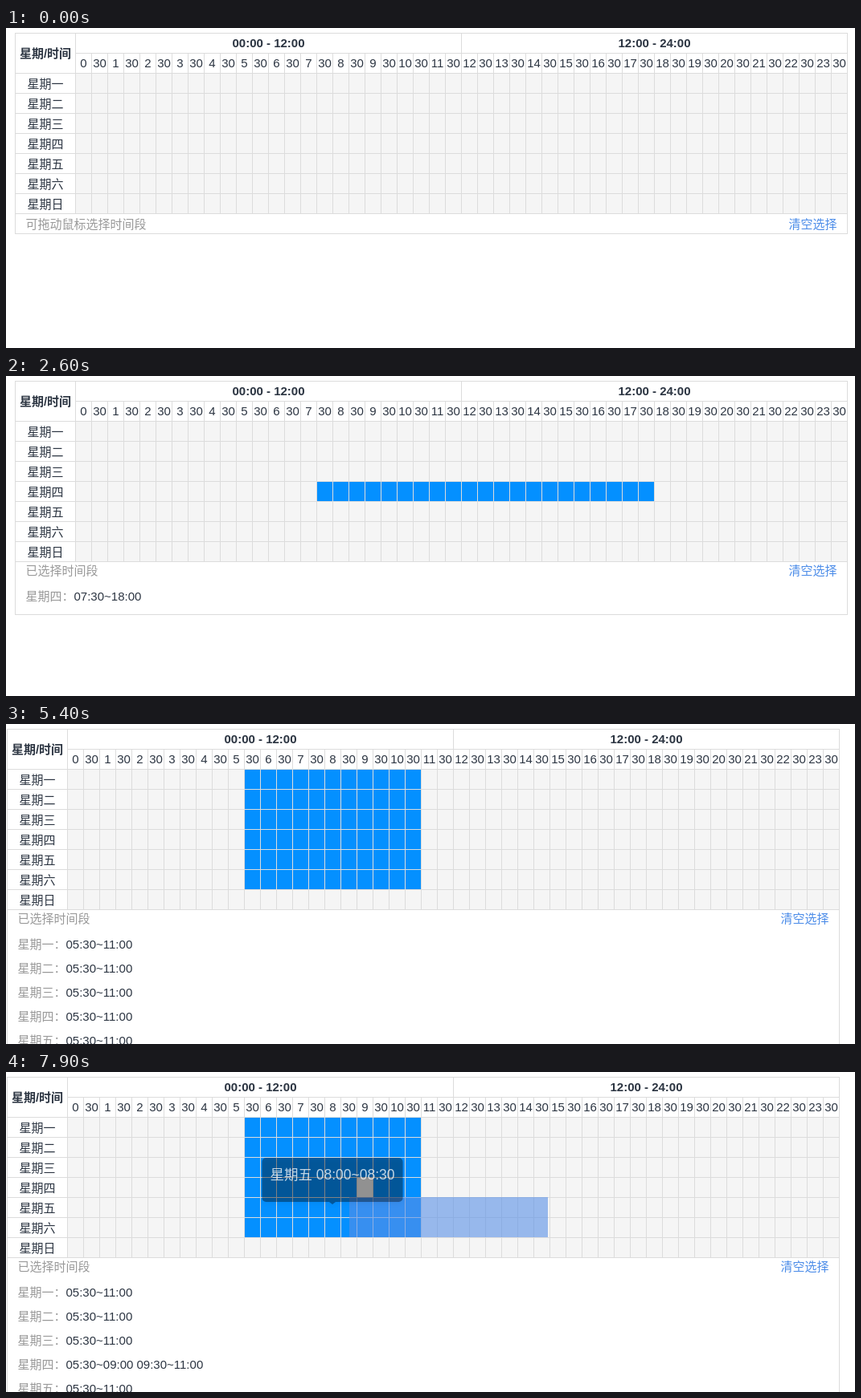
Write an HTML page with a canvas that moves like this. It is 1056 by 399 pixels and loops after 8000 ms.

```html
<!DOCTYPE html>
<html lang="zh-CN">
<head>
<meta charset="utf-8">
<style>
html, body { margin: 0; width: 100%; height: 100%; overflow: hidden; background: #fff; }
canvas { display: block; }
</style>
</head>
<body>
<canvas id="stage" width="1056" height="399"></canvas>
<script>
const ctx = document.getElementById('stage').getContext('2d');
const FONT = '"Liberation Sans", "Noto Sans CJK SC", sans-serif';
const DAYS = [...'一二三四五六日'].map(d => '星期' + d);
const INK = '#2c3542', GREY = '#999', LINE = '#dcdcdc', LINK = '#4a8be8';
const LOOP = 8000, STEP = 100;
const CELL_W = 20, ROW_H = 25, LEFT = 11, GRID_X = 86, GRID_Y = 56, RIGHT = 1046;

// Pointer walks as stops [step, column, row]; a tip follows each walk
const WALKS = [
  [[3, 27, 1]],
  [[6, 24, 2], [9, 14, 2], [13, 20, 3]],
  [[19, 33, 3], [24, 38, 4], [25, 42, 6]],
  [[35, 23, 5], [37, 21, 5]],
  [[43, 11, 0], [50, 15, 2]],
  [[53, 17, 3]],
  [[57, 18, 3], [60, 18, 3], [62, 6, 4]],
  [[65, 16, 5], [67, 29, 6]],
  [[70, 29, 4]],
  [[73, 28, 5]],
  [[79, 16, 4]]
];

// Selection boxes growing from one corner to the other; power shapes the growth
const DRAGS = [
  { start: 14, end: 17, from: [387, 132], to: [807, 157], power: .2 },
  { start: 38, end: 43, from: [517, 199], to: [306, 57], power: 1.5 },
  { start: 75, end: 79, from: [684, 206], to: [437, 156], power: 1 }
];

const mix = (a, b, k) => a + (b - a) * k;

function isSelected(step, row, col) {
  if (step >= 18 && step < 30) return row === 3 && col >= 15 && col <= 35;
  if (step < 44 || row > 5 || col < 11 || col > 21) return false;
  return !(step >= 60 && row === 3 && col === 18);
}

function clock(slot) {
  return String(slot >> 1).padStart(2, '0') + (slot % 2 ? ':30' : ':00');
}

function rangesOf(step, row) {
  const ranges = [];
  for (let col = 0, start = -1; col <= 48; col++) {
    const on = col < 48 && isSelected(step, row, col);
    if (on && start < 0) start = col;
    if (!on && start >= 0) {
      ranges.push(clock(start) + '~' + clock(col));
      start = -1;
    }
  }
  return ranges.join(' ');
}

function text(str, x, y, { color = INK, align = 'center', size = 15, weight = '' } = {}) {
  ctx.font = `${weight} ${size}px ${FONT}`;
  ctx.fillStyle = color;
  ctx.textAlign = align;
  ctx.fillText(str, x, y);
}

function rect(color, x, y, w, h) {
  ctx.fillStyle = color;
  ctx.fillRect(x, y, w, h);
}

const hLine = (x0, x1, y) => rect(LINE, x0, y, x1 - x0 + 1, 1);
const vLine = (x, y0, y1) => rect(LINE, x, y0, 1, y1 - y0 + 1);

function drawTable(step) {
  const gridEnd = GRID_Y + 7 * ROW_H;
  rect('#f5f5f5', GRID_X, GRID_Y, 48 * CELL_W, 7 * ROW_H);
  for (let row = 0; row < 7; row++)
    for (let col = 0; col < 48; col++)
      if (isSelected(step, row, col))
        rect('#0490ff', GRID_X + col * CELL_W, GRID_Y + row * ROW_H, CELL_W, ROW_H);

  hLine(LEFT, RIGHT, 6);
  hLine(GRID_X, RIGHT, 31);
  for (let row = 0; row <= 7; row++) hLine(LEFT, RIGHT, GRID_Y + row * ROW_H);
  for (let col = 0; col <= 48; col++)
    vLine(GRID_X + col * CELL_W, col % 24 ? 31 : 6, gridEnd);

  const bold = { weight: 'bold' };
  text('星期/时间', 49, 37, bold);
  text('00:00 - 12:00', 326.5, 24, bold);
  text('12:00 - 24:00', 806.5, 24, bold);
  for (let col = 0; col < 48; col++)
    text(col % 2 ? '30' : col / 2, GRID_X + 10.5 + col * CELL_W, 49);
  DAYS.forEach((day, row) => text(day, 49, 75 + row * ROW_H));
}

function drawFooter(step) {
  const hint = { align: 'left', color: GREY };
  const lines = DAYS.map((day, row) => [day, rangesOf(step, row)]).filter(line => line[1]);
  const bottom = lines.length ? 267 + 30 * lines.length : 256;
  const base = lines.length ? 248 : 250;
  vLine(LEFT, 6, bottom);
  vLine(RIGHT, 6, bottom);
  hLine(LEFT, RIGHT, bottom);
  text(lines.length ? '已选择时间段' : '可拖动鼠标选择时间段', 24.5, base, hint);
  text('清空选择', 1033.5, base, { align: 'right', color: LINK });
  lines.forEach(([day, ranges], i) => {
    text(day + '：', 24.5, 280 + 30 * i, hint);
    text(ranges, 84.5, 280 + 30 * i, { align: 'left' });
  });
}

function drawDrag(step) {
  const drag = DRAGS.find(d => step >= d.start && step <= d.end);
  if (!drag) return;
  const { start, end, from: [x0, y0], to: [x1, y1], power } = drag;
  const k = ((step - start + 1) / (end - start + 1)) ** power;
  // rows are reached sooner than columns
  const x = Math.round(mix(x0, x1, k)), y = Math.round(mix(y0, y1, Math.sqrt(k)));
  rect('rgba(89,143,230,.6)', x0, y0, x - x0, y - y0);
}

function drawTip(step) {
  const walk = WALKS.find(w => step >= w[0][0] && step <= w.at(-1)[0]);
  if (!walk) return;
  const next = walk.findIndex(stop => stop[0] >= step);
  const b = walk[next], a = walk[next - 1] || b;
  const k = a === b ? 0 : (step - a[0]) / (b[0] - a[0]);
  const col = Math.round(mix(a[1], b[1], k)), row = Math.round(mix(a[2], b[2], k));
  const fading = step === walk[0][0] || step === walk.at(-1)[0];

  const label = `${DAYS[row]} ${clock(col)}~${clock(col + 1)}`;
  const x = GRID_X + 10 + col * CELL_W, y = 7 + row * ROW_H;
  ctx.save();
  ctx.globalAlpha = fading ? .5 : .95;
  ctx.font = `17.5px ${FONT}`;
  const w = ctx.measureText(label).width + 20;
  ctx.shadowColor = 'rgba(0,0,0,.15)';
  ctx.shadowBlur = 6;
  ctx.shadowOffsetY = 2;
  ctx.fillStyle = 'rgba(0,0,0,.74)';
  ctx.beginPath();
  ctx.roundRect(x - w / 2, y, w, 55, 5);
  ctx.moveTo(x - 4, y + 55);
  ctx.lineTo(x + 4, y + 55);
  ctx.lineTo(x, y + 58);
  ctx.fill();
  ctx.shadowColor = 'transparent';
  ctx.globalAlpha = fading ? .75 : 1;
  text(label, x, y + 27, { color: '#fff', size: 17.5 });
  ctx.restore();
}

function frame(now) {
  const step = Math.floor(now % LOOP / STEP);
  rect('#fff', 0, 0, 1056, 399);
  ctx.save();
  // the page scrollbar nudges the table left once the list is long
  if (step >= 44) ctx.translate(-10, 0);
  drawTable(step);
  drawFooter(step);
  drawDrag(step);
  drawTip(step);
  ctx.restore();
  requestAnimationFrame(frame);
}
requestAnimationFrame(frame);
</script>
</body>
</html>
```
